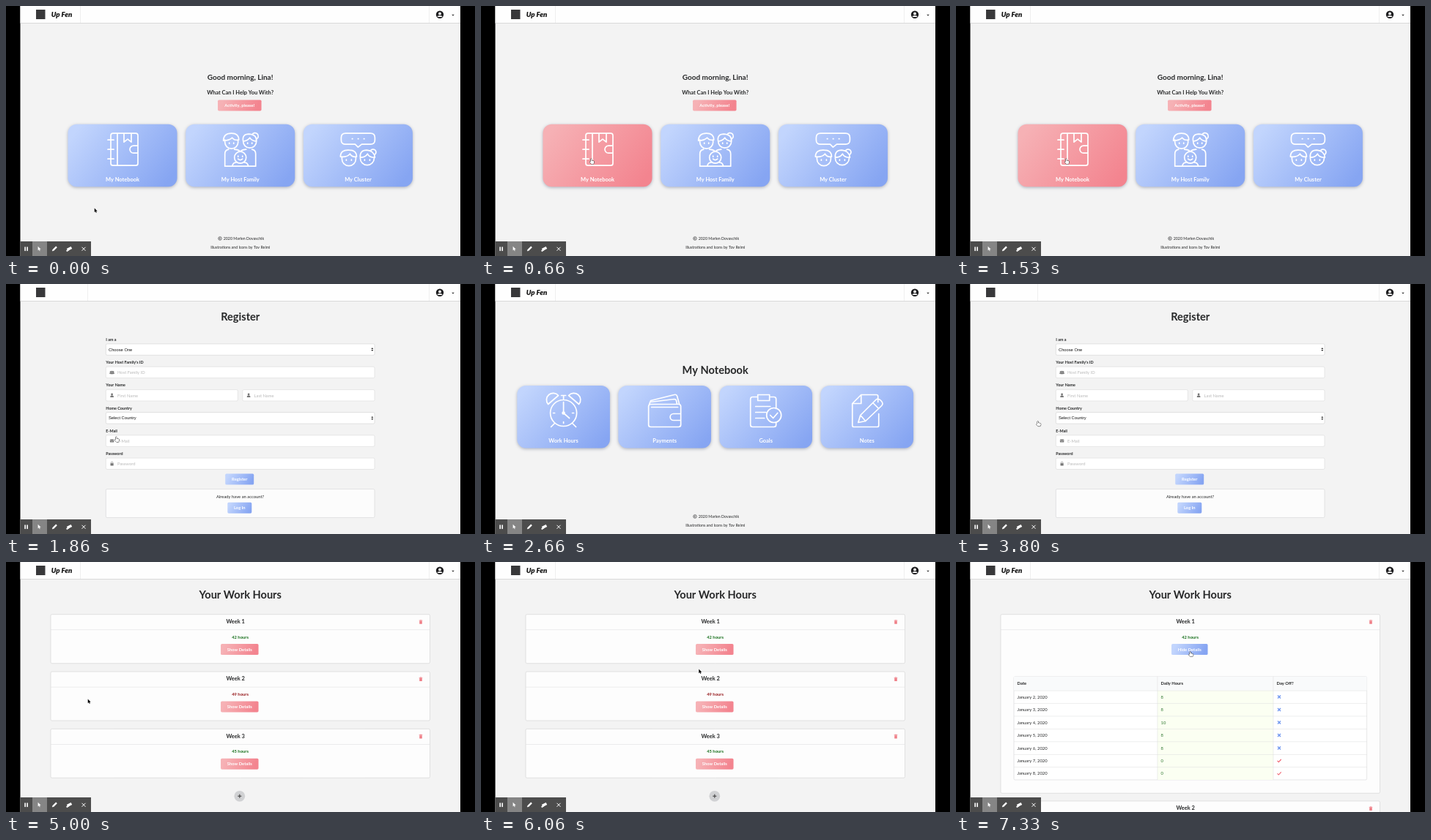
An HTML page with a canvas that plays this animation: 640x342 px, repeating every 8000 ms.

```html
<!DOCTYPE html>
<html lang="en">
<head>
<meta charset="utf-8">
<title>Notebook walkthrough</title>
<style>
html, body { margin: 0; width: 100%; height: 100%; overflow: hidden; background: #000; }
canvas { display: block; width: 640px; height: 342px; }
</style>
</head>
<body>
<canvas id="stage" width="640" height="342"></canvas>
<script>
const ctx = document.getElementById('stage').getContext('2d');
const LOOP = 8000;
const BLUE = ['#c2d5fd', '#86a5f2'];
const PINK = ['#f6b1b5', '#f3848f'];
const INK = '#272829';
const BODY = 5.83;

// Line icons, each centred on the origin in a box of about 48 px.
const ICONS = {
  notebook: 'M-13-22H18Q21-22 21-19V19Q21 22 18 22H-13Q-16 22-16 19V-19Q-16-22-13-22Z M-7-22V22 M2-22V-10L7-14L12-10V-22 M21-5H15A5 5 0 0 0 15 5H21 M-20-13H-12 M-20 0H-12 M-20 13H-12',
  family: 'M-21-13V-10A9 9 0 0 0-3-10V-13 M-23-12Q-23-22-12-22Q-2-22-2-13Q-8-12-11-16Q-15-12-23-12Z M4-11A9 9 0 0 0 22-11 M4-11Q2-21 12-21Q23-20 22-11Q15-12 13-16Q10-12 4-11Z M16-20A4.5 4.5 0 1 1 22-14 M-16 0Q-21 1-21 6V23H21V6Q21 1 16 0 M-8 0Q-3 0 0 3Q3 0 8 0 M-8 11A8 8 0 0 1 8 11A8 8 0 0 1-8 11Z M-11 23Q-10 18-6 18 M11 23Q10 18 6 18 M-3 13Q0 16 3 13 M-3 9V10 M3 9V10 M-15-9V-8 M-9-9V-8 M10-9V-8 M16-9V-8',
  cluster: 'M-17-22H17Q23-22 23-16V-13Q23-7 17-7H5L0-3L-4-7H-17Q-23-7-23-13V-16Q-23-22-17-22Z M-8-14.5H-7.5 M0-14.5H.5 M8-14.5H8.5 M-22 10V13A9.5 9.5 0 0 0-3 13V10 M-24 10Q-24 0-12 1Q-2 1-2 10Q-8 11-11 6Q-15 11-24 10Z M3 12A9.5 9.5 0 0 0 22 12 M3 11Q2 1 12 1Q22 2 23 11Q15 11 13 6Q10 11 3 11Z M17 2A4 4 0 1 1 23 7 M-16 14V15 M-9 14V15 M9 14V15 M16 14V15',
  clock: 'M-18 3A18 18 0 0 1 18 3A18 18 0 0 1-18 3Z M0-12V3L8 10 M-1.5 3A1.5 1.5 0 0 1 1.5 3A1.5 1.5 0 0 1-1.5 3 M-21-9A9 9 0 0 1-7-21Z M21-9A9 9 0 0 0 7-21Z M0-15V-21 M-3-21H3 M-12 17L-17 22 M12 17L17 22 M-14 3H-12 M12 3H14 M0 15V17',
  wallet: 'M-19-9H19Q22-9 22-6V19Q22 22 19 22H-19Q-22 22-22 19V-6Q-22-9-19-9Z M22 4H12A4.5 4.5 0 0 0 12 13H22 M-21-9L-19-14L13-22Q16-23 17-20L20-9 M-20-12L13-16Q16-16 16-13L17-9 M-18-5H18',
  goals: 'M-11-19H-18Q-21-19-21-16V19Q-21 22-18 22H11Q14 22 14 19V16 M14-3V-16Q14-19 11-19H5 M-11-22H5V-14H-11Z M-14-6H6 M-14 2H0 M-14 10H-2 M1 6A10 10 0 0 1 21 6A10 10 0 0 1 1 6Z M6 6L10 10L16 3',
  notes: 'M15-12V-20Q15-22 13-22H-8L-20-10V20Q-20 22-18 22H14Q16 22 16 20V4 M-20-10H-8V-22 M-12 16L-9 6L12-15Q15-18 19-14T20-7L-2 14Z M8-11L16-3 M-9 6L-2 14'
};
for (const name in ICONS) ICONS[name] = new Path2D(ICONS[name]);

const ARROW = new Path2D('M0 0V5.6L1.3 4.4L2.2 6.5L3.1 6.1L2.2 4.1H4Z');
const HAND = new Path2D('M-.6 4V.4Q0-.4.6.4V2.7Q2 2.3 2.5 3Q4 2.6 4 4V5.2L3.2 7H.2L-2 4.3Q-1.6 3.4-.6 4Z');

function text(str, x, y, size, { color = INK, weight = 400, align = 'center', font = 'Lato', style = '' } = {}) {
  ctx.font = `${style} ${weight} ${size}px ${font}, sans-serif`;
  ctx.textAlign = align;
  ctx.fillStyle = color;
  ctx.fillText(str, x, y + size * 0.355);
}
const bold = (str, x, y, size, opts) => text(str, x, y, size, { weight: 700, ...opts });

function rect(x, y, w, h, fill) {
  ctx.fillStyle = fill;
  ctx.fillRect(x, y, w, h);
}

function box(x, y, w, h, r, fill, stroke) {
  ctx.beginPath();
  ctx.roundRect(x, y, w, h, r);
  if (fill) { ctx.fillStyle = fill; ctx.fill(); }
  if (stroke) { ctx.strokeStyle = stroke; ctx.lineWidth = 0.6; ctx.stroke(); }
}

function disc(x, y, r, fill) {
  ctx.beginPath();
  ctx.arc(x, y, r, 0, 7);
  ctx.fillStyle = fill;
  ctx.fill();
}

function line(points, color, width = 0.6) {
  ctx.beginPath();
  points.forEach(([x, y]) => ctx.lineTo(x, y));
  ctx.strokeStyle = color;
  ctx.lineWidth = width;
  ctx.stroke();
}

function at(x, y, draw) {
  ctx.save();
  ctx.translate(x, y);
  draw();
  ctx.restore();
}

function slope(x, y, w, h, [from, to]) {
  const g = ctx.createLinearGradient(x + w * 0.12, y, x + w * 0.88, y + h);
  g.addColorStop(0, from);
  g.addColorStop(1, to);
  return g;
}

function card(cx, y, w, icon, label, colors) {
  const x = cx - w / 2, h = 85.5;
  ctx.save();
  ctx.shadowColor = 'rgba(60,70,100,.38)';
  ctx.shadowBlur = 4;
  ctx.shadowOffsetY = 1.2;
  box(x, y, w, h, 12, slope(x, y, w, h, colors));
  ctx.restore();
  at(cx, y + 34.5, () => {
    ctx.strokeStyle = '#fff';
    ctx.lineWidth = 1.7;
    ctx.lineCap = ctx.lineJoin = 'round';
    ctx.stroke(ICONS[icon]);
  });
  bold(label, cx, y + 75.2, 7.47, { color: '#fff' });
}

function button(cx, y, w, label, colors) {
  box(cx - w / 2, y, w, 15, 1.7, slope(cx - w / 2, y, w, 15, colors));
  bold(label, cx, y + 7.5, BODY, { color: '#fff' });
}

function header(branded) {
  rect(19.5, 0, 600.5, 342, '#f3f3f3');
  rect(19.5, 0, 600.5, 23, '#fefefe');
  rect(19.5, 23, 600.5, 0.8, '#d4d4d5');
  rect(branded ? 101 : 111, 0, 0.6, 23, '#e4e4e5');
  rect(577, 0, 0.6, 23, '#e4e4e5');
  rect(41, 5, 12.5, 13, '#38383a');
  if (branded) text('Up Fen', 76, 11.3, 9.6, { weight: 900, style: 'italic', color: '#111' });
  disc(592, 11.8, 5.2, '#1d1d1f');
  disc(592, 10.4, 1.9, '#fff');
  ctx.beginPath();
  ctx.ellipse(592, 15, 3.3, 1.9, 0, Math.PI, 0);
  ctx.fillStyle = '#fff';
  ctx.fill();
  triangle(610, 12.6, 1.8, -1.8, '#222');
}

function triangle(x, y, half, rise, color) {
  ctx.beginPath();
  ctx.moveTo(x - half, y + rise / 2);
  ctx.lineTo(x + half, y + rise / 2);
  ctx.lineTo(x, y - rise / 2);
  ctx.fillStyle = color;
  ctx.fill();
}

function footer() {
  ctx.beginPath();
  ctx.arc(292, 318, 2.3, 0, 7);
  ctx.strokeStyle = INK;
  ctx.lineWidth = 0.6;
  ctx.stroke();
  ctx.beginPath();
  ctx.arc(292, 318, 1, 0.7, 5.6);
  ctx.stroke();
  text('2020 Marlen Dovaschik', 296.7, 318, 5.3, { align: 'left' });
  text('Illustrations and Icons by Tov Relmi', 319.7, 330, 5.3);
}

function home(pointer) {
  header(true);
  bold('Good morning, Lina!', 319.6, 97, 10);
  bold('What Can I Help You With?', 319.6, 118, 7.48);
  button(318.8, 128.5, 59.5, 'Activity, please!', PINK);
  card(159, 161.7, 149, 'notebook', 'My Notebook', pointer.y < 247 ? PINK : BLUE);
  card(319.7, 161.7, 149, 'family', 'My Host Family', BLUE);
  card(480.4, 161.7, 149, 'cluster', 'My Cluster', BLUE);
  footer();
}

function notebook(hovered) {
  header(true);
  bold('My Notebook', 319.7, 117.5, 14.6);
  [['clock', 'Work Hours'], ['wallet', 'Payments'], ['goals', 'Goals'], ['notes', 'Notes']]
    .forEach(([icon, label], i) =>
      card(112.6 + i * 138.05, 139, 126.6, icon, label, hovered && i === 0 ? PINK : BLUE));
  footer();
}

function person(x, y, s = 1) {
  disc(x, y - 1.3 * s, 1.4 * s, '#777');
  box(x - 2.3 * s, y + 0.3 * s, 4.6 * s, 2.3 * s, [1.5, 1.5, 0, 0], '#777');
}

const FIELD_ICONS = {
  person,
  group(x, y) { person(x - 1.9, y, 0.7); person(x + 1.9, y, 0.7); person(x, y + 0.2, 0.85); },
  mail(x, y) {
    box(x - 2.7, y - 2, 5.4, 4, 0.5, '#777');
    line([[x - 2.7, y - 1.2], [x, y + 0.6], [x + 2.7, y - 1.2]], '#fff', 0.5);
  },
  lock(x, y) {
    box(x - 2.1, y - 0.5, 4.2, 3.1, 0.5, '#777');
    box(x - 1.3, y - 2.5, 2.6, 3, 1.2, null, '#777');
  }
};

function field(x, y, w, icon, hint) {
  box(x, y, w, 15.4, 1.7, '#fff', '#d8d8d9');
  FIELD_ICONS[icon](x + 8.3, y + 7.7);
  text(hint, x + 15.7, y + 7.9, BODY, { align: 'left', color: '#b9b9b9' });
}

function select(y, label) {
  box(136.3, y, 366.7, 15.4, 1.7, '#fff', '#d0d0d1');
  text(label, 140, y + 7.6, 5.75, { align: 'left', font: 'Liberation Sans', color: '#111' });
  triangle(499.8, y + 6.2, 1.4, 2, '#222');
  triangle(499.8, y + 9.2, 1.4, -2, '#222');
}

function register() {
  header(false);
  bold('Register', 319.7, 45.3, 14.6);
  ['I am a', "Your Host Family's ID", 'Your Name', 'Home Country', 'E-Mail', 'Password']
    .forEach((label, i) => bold(label, 136.3, 75.9 + i * 31.25, 5.42, { align: 'left' }));
  select(81.9, 'Choose One');
  field(136.3, 113.2, 366.7, 'group', 'Host Family ID');
  field(136.3, 144.6, 180, 'person', 'First Name');
  field(322.8, 144.6, 180.2, 'person', 'Last Name');
  select(175.7, 'Select Country');
  field(136.3, 206.9, 366.7, 'mail', 'E-Mail');
  field(136.3, 238.1, 366.7, 'lock', 'Password');
  button(318.7, 259.6, 39, 'Register', BLUE);
  box(136.3, 280.6, 366.7, 39, 1.7, '#fcfcfc', '#d4d4d5');
  text('Already have an account?', 319.6, 290.6, BODY);
  button(318.8, 298.8, 33, 'Log In', BLUE);
}

function trash(x, y) {
  box(x - 1.8, y - 1.4, 3.6, 4.2, 0.5, '#ef7f88');
  rect(x - 2.3, y - 2.4, 4.6, 0.8, '#ef7f88');
  rect(x - 0.8, y - 2.9, 1.6, 0.6, '#ef7f88');
}

function week(n, hours, y, h, label, colors) {
  box(61, y, 517.5, h, 1.7, '#fdfdfd', '#d0d0d1');
  rect(61, y + 20.8, 517.5, 0.6, '#e0e0e1');
  bold('Week ' + n, 313.2, y + 9.7, 7.48);
  trash(566, y + 10.3);
  bold(hours + ' hours', 319.6, y + 30.9, BODY, { color: hours > 45 ? '#971b1e' : '#19701d' });
  button(318.8, y + 40.4, label === 'Show Details' ? 51.5 : 49.5, label, colors);
}

function table() {
  const left = 79, top = 156.5, headH = 19.3, rowH = 17.46, cols = [79, 275, 433];
  const bottom = top + headH + rowH * 7;
  box(left, top, 481.6, bottom - top, 1.7, '#fff', '#d6d6d7');
  rect(left, top, 481.6, headH, '#f9fafb');
  rect(275, top + headH, 158, bottom - top - headH, '#fbfff2');
  ['Date', 'Daily Hours', 'Day Off?'].forEach((name, i) =>
    bold(name, cols[i] + 4.6, top + 9.7, BODY, { align: 'left' }));
  [8, 8, 10, 8, 8, 0, 0].forEach((hours, i) => {
    const y = top + headH + rowH * i, mid = y + 8.8;
    rect(left, y, 481.6, 0.5, '#dcdddd');
    text(`January ${i + 2}, 2020`, 83.6, mid, BODY, { align: 'left' });
    text(hours, 279.6, mid, BODY, { align: 'left', color: '#2c742e' });
    if (hours) {
      line([[439, mid - 2], [443, mid + 2]], '#7298f0', 1.4);
      line([[443, mid - 2], [439, mid + 2]], '#7298f0', 1.4);
    } else {
      line([[438.5, mid], [440.3, mid + 1.7], [443.7, mid - 1.9]], '#f0626f', 1.1);
    }
  });
  cols.slice(1).forEach(x => rect(x - 0.3, top, 0.5, bottom - top, '#dcdddd'));
}

function workHours(pointer, open) {
  header(true);
  bold('Your Work Hours', 319.7, 45.3, 14.6);
  const hovered = pointer.y < 127 && pointer.x > 293;
  week(1, 42, 71.7, open ? 244.6 : 67, open ? 'Hide Details' : 'Show Details', hovered ? BLUE : PINK);
  if (open) {
    table();
    week(2, 49, 327, 67, 'Show Details', PINK);
    return;
  }
  week(2, 49, 150, 67, 'Show Details', PINK);
  week(3, 45, 228.3, 67, 'Show Details', PINK);
  disc(318.8, 320.3, 7.4, '#d0d1d3');
  line([[316.3, 320.3], [321.3, 320.3]], '#4a4a4b', 1.2);
  line([[318.8, 317.8], [318.8, 322.8]], '#4a4a4b', 1.2);
}

function toolbar() {
  rect(19.5, 322, 96.5, 20, '#4c4c4c');
  rect(36, 322, 20, 20, '#858585');
  rect(25.3, 329.5, 1.6, 5.6, '#fff');
  rect(28.3, 329.5, 1.6, 5.6, '#fff');
  at(43.6, 328.8, () => { ctx.fillStyle = '#fff'; ctx.fill(ARROW); });
  line([[63.2, 335.2], [64.2, 334.2]], '#fff', 1.2);
  line([[64, 334.4], [69, 329.4]], '#fff', 2.3);
  line([[82.6, 335.3], [85.6, 333.5]], '#fff', 2);
  line([[83.6, 333.6], [89.4, 330.4]], '#fff', 3.4);
  line([[103.5, 329.8], [108.5, 334.8]], '#fff', 1);
  line([[108.5, 329.8], [103.5, 334.8]], '#fff', 1);
}

// Pointer stops: start and end of each glide, and where it leads.
const MOVES = [
  [60, 620, 150.3, 209],
  [3000, 3580, 111.7, 187.6],
  [5000, 5800, 297.3, 146.6],
  [6060, 6600, 319.6, 122.5]
];

function pointerAt(t) {
  let x = 120.7, y = 276.6;
  for (const [start, end, toX, toY] of MOVES) {
    const p = Math.min(1, Math.max(0, (t - start) / (end - start)));
    const e = p * p * (3 - 2 * p);
    x += (toX - x) * e;
    y += (toY - y) * e;
  }
  return { x, y };
}

function drawPointer({ x, y }, hand) {
  at(x, y, () => {
    const shape = hand ? HAND : ARROW;
    ctx.lineJoin = 'round';
    ctx.lineWidth = 0.9;
    ctx.strokeStyle = hand ? '#111' : '#fff';
    ctx.stroke(shape);
    ctx.fillStyle = hand ? '#fff' : '#000';
    ctx.fill(shape);
  });
}

function draw(t) {
  const pointer = pointerAt(t);
  rect(0, 0, 640, 342, '#000');
  if (t < 1860) home(pointer);
  else if (t < 1930) register();
  else if (t < 3800) notebook(t >= 2800);
  else if (t < 3930) register();
  else workHours(pointer, t >= 6700);
  toolbar();
  const hand = t < 3930 ? pointer.y < 247 : pointer.y < 127;
  const hidden = t >= 2660 && t < 2800;
  if (!hidden) drawPointer(pointer, hand);
}

function frame(now) {
  draw(now % LOOP);
  requestAnimationFrame(frame);
}
draw(0);
requestAnimationFrame(frame);
</script>
</body>
</html>
```
